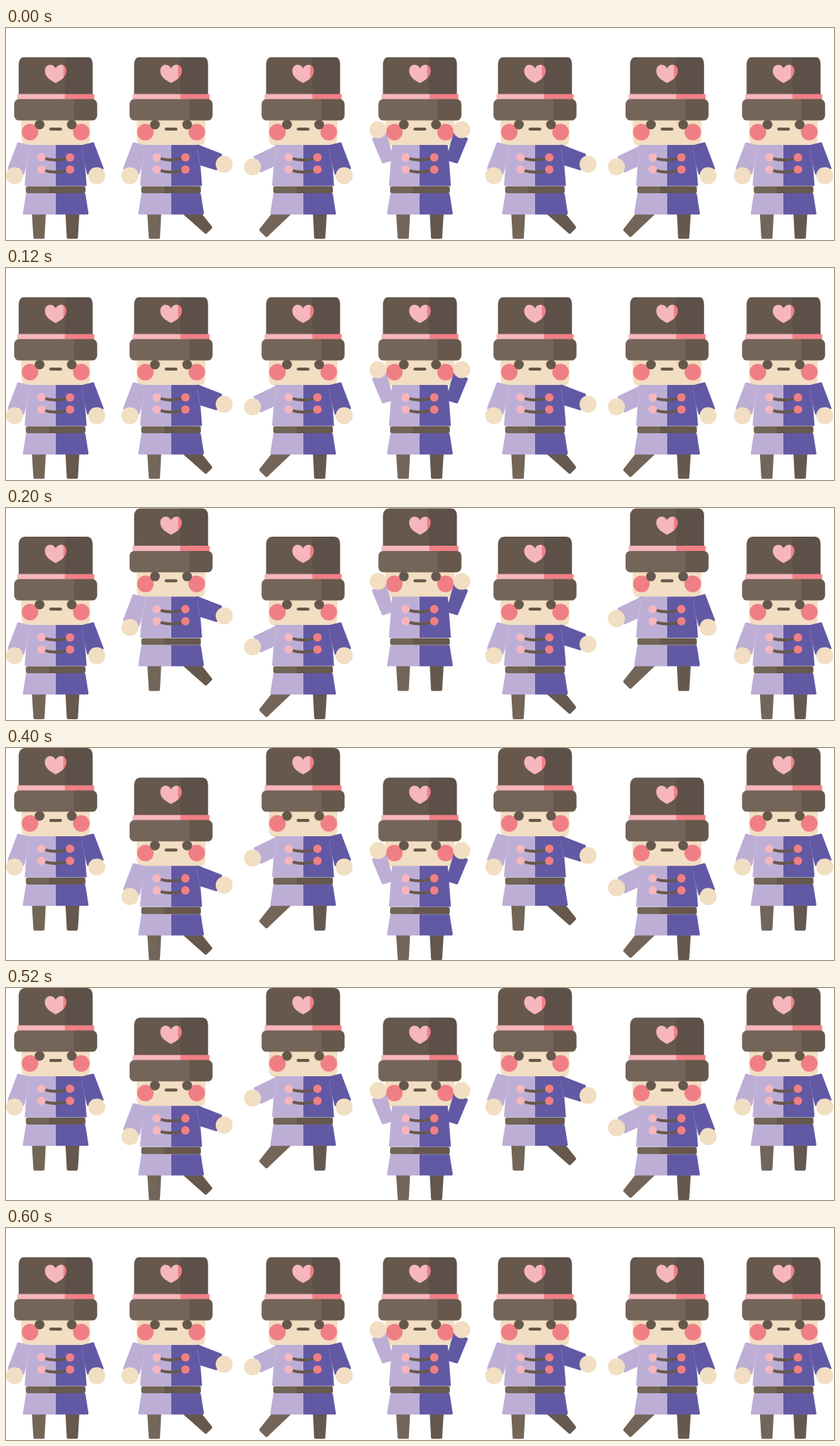
Write an HTML page that moves like this. It is 1097 px wide and 281 px high and loops after 0.8 s.

```html
<!DOCTYPE html>
<html lang="en">
<head>
<meta charset="utf-8">
<title>Dancing soldiers</title>
<style>
  html, body { margin: 0; width: 100%; height: 100%; overflow: hidden; background: #fff; }
  svg { display: block; width: 100%; height: 100%; }
</style>
</head>
<body>
<svg id="stage" viewBox="0 0 1097 281" preserveAspectRatio="none"></svg>
<script>
const BROWN = '#66584c', LIGHT = '#736558', DARK = '#5d5048';
const PINK = '#f6b6bd', ROSE = '#f07f85', SKIN = '#f2dec2';
const LILAC = '#bdaed6', VIOLET = '#6259a4';

// Two flat tones meeting at x
const tones = (id, x, left, right) => {
  const at = (x + 100) / 200;
  return `<linearGradient id="${id}" gradientUnits="userSpaceOnUse" x1="-100" x2="100">
    <stop offset="${at}" stop-color="${left}"/><stop offset="${at}" stop-color="${right}"/></linearGradient>`;
};
const defs = `<defs>${
  tones('hat', 12, BROWN, DARK) + tones('heart', 9.7, PINK, ROSE) + tones('band', 12.3, PINK, ROSE) +
  tones('brim', 24, LIGHT, BROWN) + tones('belt', -9, LIGHT, BROWN) + tones('coat', 0, LILAC, VIOLET)
}<clipPath id="trim"><rect y="38.8" width="1097" height="241.2"/></clipPath></defs>`;

const dot = (x, y, r, fill) => `<circle cx="${x}" cy="${y}" r="${r}" fill="${fill}"/>`;
const path = (d, fill) => `<path d="${d}" fill="${fill}"/>`;
const box = (x, y, w, h, r, fill) =>
  `<rect x="${x}" y="${y}" width="${w}" height="${h}" rx="${r}" fill="${fill}"/>`;
// Polygon with corners rounded by its own outline
const poly = (points, fill, round) =>
  `<polygon points="${points}" fill="${fill}" stroke="${fill}" stroke-width="${round}" stroke-linejoin="round"/>`;
const line = (d, width, color = BROWN) =>
  `<path d="${d}" fill="none" stroke="${color}" stroke-width="${width}" stroke-linecap="round"/>`;
const mirror = (side, points) => points.map((v, i) => i % 2 ? v : v * side);

const ARMS = {
  down: { sleeve: [49.5, 153, 34, 157, 43, 193, 62, 186], hand: [54.5, 195.7] },
  right: { sleeve: [35, 156, 66, 168, 60, 187, 34, 179], hand: [70.4, 180.5] },
  left: { sleeve: [33, 156, 64, 171, 56, 190, 34, 180], hand: [67, 184] },
  up: { sleeve: [62, 147, 49, 178, 36, 174, 46, 140], hand: [55.4, 134.7] }
};
const LEGS = {
  stand: [15, 245, 29.5, 245, 27.5, 278, 16.7, 278],
  right: [18, 246, 38, 246, 52.5, 264.3, 46, 270.7],
  left: [18, 246, 39, 246, 56, 267.5, 48.5, 275]
};

const arm = (side, pose) => {
  const { sleeve, hand } = ARMS[pose];
  const seam = pose === 'up' ? '' : line(`M${34.5 * side} 161L${39 * side} 186`, 0.7, '#ffffff38');
  return poly(mirror(side, sleeve), side < 0 ? LILAC : VIOLET, 3) + seam +
    dot(hand[0] * side, hand[1], 11.3, SKIN);
};
const leg = (side, pose) => poly(mirror(side, LEGS[pose]), side < 0 ? LIGHT : BROWN, 4);
const button = (x, y) => dot(x, y, 5.6, x < 0 ? PINK : ROSE);
const braid = y => line(`M-16 ${y + 1}Q0 ${y + 6} 16 ${y + 1}`, 3.8) + button(-19, y) + button(19, y);

function soldier(armL, armR, legL, legR) {
  return leg(-1, legL) + leg(1, legR) +
    path('M-45.5 115V146Q-45.5 156-36 156H36Q45.5 156 45.5 146V115Z', SKIN) +
    dot(-34, 138, 11, ROSE) + dot(34, 138, 11, ROSE) +
    line('M-6.5 134H6.5', 4) +
    path('M-49 88.5V47Q-48 38-40 38H41Q48.500 38 49 47V88.5Z', 'url(#hat)') +
    path('M0 53.5C-3 46.500-14.3 47-14.3 57C-14.3 65-6 70 0 73C6 70 14.3 65 14.3 57C14.3 47 3 46.5 0 53.5Z', 'url(#heart)') +
    box(-51, 87.5, 102, 8, 1, 'url(#band)') +
    box(-55, 94.3, 110, 28.3, 6.5, 'url(#brim)') +
    dot(-21.3, 128, 6.5, BROWN) + dot(21.3, 128, 6.5, BROWN) +
    poly([-36, 156, 36, 156, 40, 208.5, -40, 208.5], 'url(#coat)', 2) +
    poly([-38, 220.5, 38, 220.5, 42, 245.7, -42, 245.7], 'url(#coat)', 3) +
    box(-39.5, 209.8, 79, 9.2, 2.5, 'url(#belt)') +
    braid(171.5) + braid(187.5) +
    arm(-1, armL) + arm(1, armR);
}

const idle = soldier('down', 'down', 'stand', 'stand');
const kickRight = soldier('down', 'right', 'stand', 'right');
const kickLeft = soldier('left', 'down', 'left', 'stand');
const cheer = soldier('up', 'up', 'stand', 'stand');
const row = [
  [65.8, idle], [218.7, kickRight], [393.6, kickLeft], [548.4, cheer],
  [700.8, kickRight], [875.8, kickLeft], [1030.2, idle]
];

const stage = document.getElementById('stage');
stage.innerHTML = defs + '<g id="troop">' +
  row.map(([x, art]) => `<g class="soldier" data-x="${x}">${art}</g>`).join('') +
  '</g><rect id="floor" y="279" width="1097" height="2" fill="#fff" opacity=".55"/>';
const troop = document.getElementById('troop');
const floor = document.getElementById('floor');
const soldiers = [...document.querySelectorAll('.soldier')];

// Heights of even and odd soldiers at each beat
const BEATS = [[0, 0], [0, -37.4], [-38, 1.2], [0, 0]];
let shown = -1;

function draw(now) {
  const beat = Math.floor(now / 200) % 4;
  if (beat !== shown) {
    shown = beat;
    const rest = beat % 3 === 0;
    soldiers.forEach((s, i) =>
      s.setAttribute('transform', `translate(${s.dataset.x} ${BEATS[beat][i % 2]})`));
    troop.setAttribute('clip-path', rest ? 'url(#trim)' : 'none');
    floor.setAttribute('visibility', rest ? 'visible' : 'hidden');
  }
  requestAnimationFrame(tick);
}
const start = performance.now();
const tick = () => draw(performance.now() - start);
draw(0);
</script>
</body>
</html>
```
